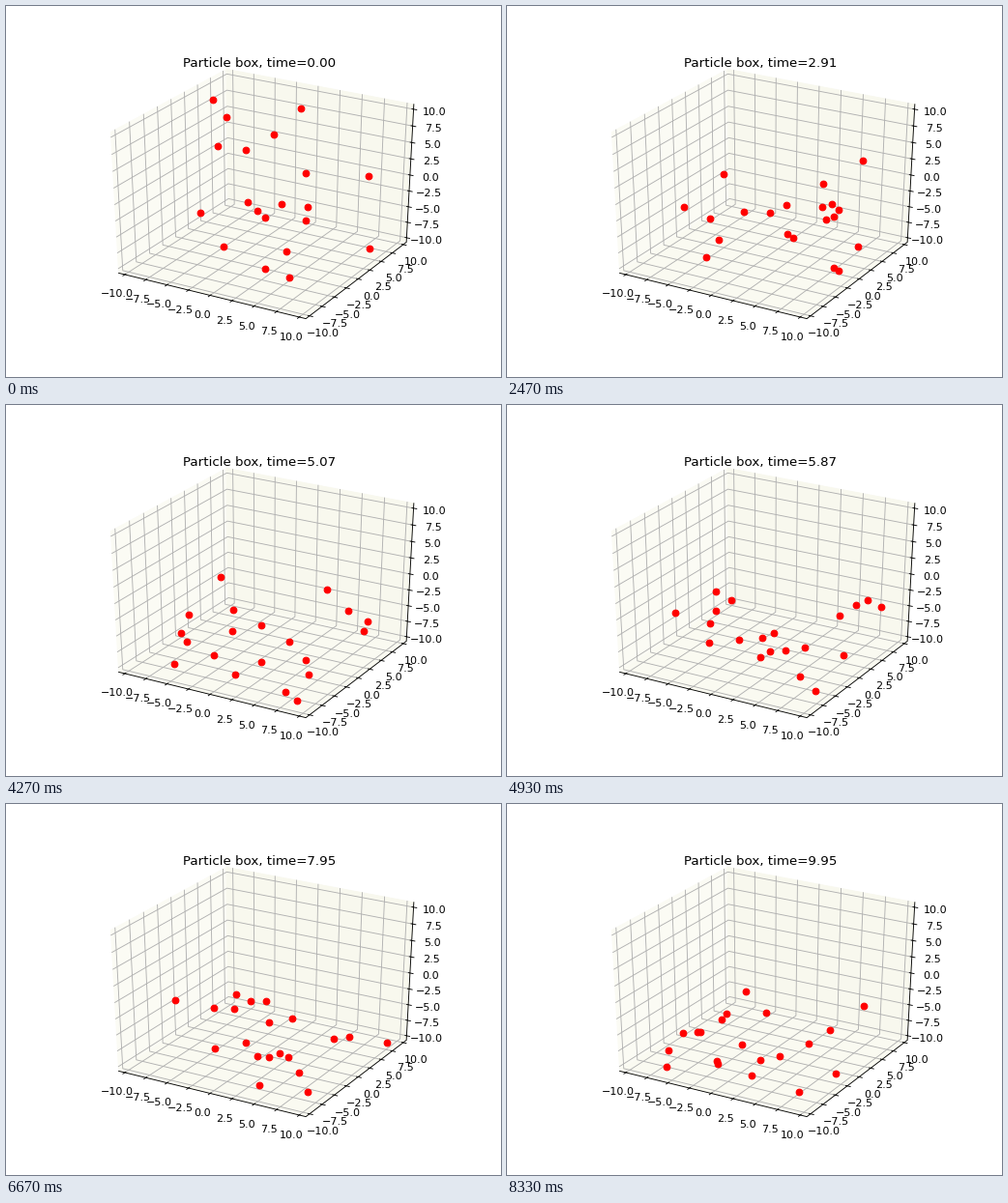
A matplotlib script for the animation above (8390 ms loop, 512x384 px).

```python
import numpy as np
import matplotlib.pyplot as plt
from matplotlib.animation import FuncAnimation

W, H, DPI = 512, 384, 80
FRAMES, LOOP_MS = 126, 8390
DT, STEPS, LEAD = 0.01, 8, 5       # simulation step, steps per frame, first-frame lag
COUNT, BOUND, LIMIT = 20, 10, 10.3
SPEED, GRAVITY, RESTITUTION = 8, 9.8, 0.85

plt.rcParams['font.family'] = 'DejaVu Sans'

# Perspective camera: elevation 30, azimuth -60; the axes span -0.5..0.5
DIST = 10
ELEV, AZIM = np.radians([30, -60])
N = np.array([np.cos(ELEV) * np.cos(AZIM), np.cos(ELEV) * np.sin(AZIM), np.sin(ELEV)])
U = np.array([-np.sin(AZIM), np.cos(AZIM), 0])
V = np.cross(N, U)
SX, SY = 0.775 * W / 0.185, 0.77 * H / 0.185
CX, CY = 0.125 * W + 0.095 * SX, 0.89 * H - 0.095 * SY


def project(points):
    p = np.asarray(points, float)
    depth = DIST - p @ N
    return np.stack([CX + SX * (p @ U) / depth, CY - SY * (p @ V) / depth], axis=-1)


def simulate(steps):
    """Particles thrown towards +x, +y, +z that fall and bounce off the walls."""
    rng = np.random.default_rng(0)
    pos = rng.uniform(-BOUND, BOUND, (COUNT, 3))
    vel = rng.uniform(0, SPEED, (COUNT, 3))
    path = [pos.copy()]
    for _ in range(steps):
        vel[:, 2] -= GRAVITY * DT
        pos += vel * DT
        hit = (np.abs(pos) > BOUND) & (pos * vel > 0)
        vel[hit] *= -1
        vel[hit[:, 2], 2] *= RESTITUTION
        pos = np.clip(pos, -BOUND, BOUND)
        path.append(pos.copy())
    return np.array(path)


path = project(simulate(STEPS * FRAMES) / (2 * LIMIT))

fig = plt.figure(figsize=(W / DPI, H / DPI), dpi=DPI, facecolor='white')
ax = fig.add_axes([0, 0, 1, 1])
ax.set(xlim=(0, W), ylim=(H, 0))
ax.axis('off')


def line(points, color, z):
    ax.plot(*project(points).T, color=color, lw=0.8, zorder=z)


E = 0.5 + 1 / 48           # pane edge
IN, OUT = 1 / 120, 1 / 60  # tick reach
LAB = E + 11.5 * 48 / (72 * (0.775 * W + 0.77 * H) / DPI) / 12

panes = {
    '#fbfbf4': [(-E, -E, -E), (-E, E, -E), (-E, E, E), (-E, -E, E)],
    '#f8f8ee': [(-E, E, -E), (E, E, -E), (E, E, E), (-E, E, E)],
    '#fafaf1': [(-E, -E, -E), (E, -E, -E), (E, E, -E), (-E, E, -E)],
}
for color, corners in panes.items():
    ax.fill(*project(corners).T, facecolor=color, edgecolor=color, lw=0.8, zorder=1)

for value in np.arange(-10, 10.1, 2.5):
    c = value / (2 * LIMIT)
    grids = ([(c, -E, -E), (c, E, -E), (c, E, E)],
             [(E, c, -E), (-E, c, -E), (-E, c, E)],
             [(-E, -E, c), (-E, E, c), (E, E, c)])
    ticks = ([(c, -E + IN, -E), (c, -E - OUT, -E)],
             [(E - IN, c, -E), (E + OUT, c, -E)],
             [(E - IN, E, c), (E + OUT, E, c)])
    labels = (c, -LAB, -LAB), (LAB, c, -LAB), (LAB, LAB, c)
    for grid, tick, label in zip(grids, ticks, labels):
        line(grid, '#b0b0b0', 2)
        line(tick, 'black', 3)
        ax.text(*project(label), f'{value:.1f}'.replace('-', '\u2212'),
                fontsize=10, ha='center', va='top', zorder=4)

line([(-E, -E, -E), (E, -E, -E), (E, E, -E), (E, E, E)], 'black', 3)

dots, = ax.plot([], [], 'o', color='red', ms=6, zorder=5)
title = ax.text(262.4, 63.07, '', fontsize=12, ha='center', va='baseline', zorder=6)


def update(i):
    step = max(0, STEPS * i - LEAD)
    dots.set_data(*path[step].T)
    title.set_text(f'Particle box, time={step * DT:.2f}')
    return dots, title


anim = FuncAnimation(fig, update, frames=FRAMES, interval=LOOP_MS / FRAMES,
                     repeat=True, repeat_delay=0, blit=False)
plt.show()
```
